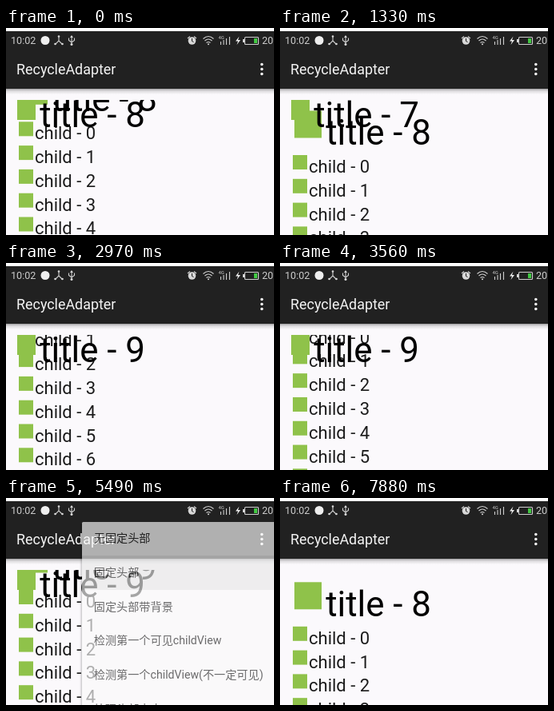
Write an HTML page that moves like this. It is 335 by 259 pixels and loops after 8 s.

```html
<!DOCTYPE html>
<html lang="en">
<head>
<meta charset="utf-8">
<title>RecycleAdapter</title>
<style>
  html, body { margin: 0; width: 100%; height: 100%; overflow: hidden; background: #fff; }
  svg { display: block; }
  text { font-family: Roboto, sans-serif; white-space: pre; }
  .title { font-size: 43.8px; }
  .child { font-size: 22px; fill: #1c1c1c; }
  .icon { fill: #8fc24a; }
  .status text { font-size: 12.6px; fill: #ccc; }
  .line { fill: none; stroke: #cfcfcf; stroke-width: 1.1; }
  .solid { fill: #d8d8d8; }
  #menu text { font: 14.15px Roboto, "Noto Sans CJK SC", "Noto Sans CJK", sans-serif; fill: #222; }
</style>
</head>
<body>
<svg id="stage" width="335" height="259" viewBox="0 0 335 259">
  <defs>
    <linearGradient id="drop" x2="0" y2="1">
      <stop stop-opacity=".36"/><stop offset=".4" stop-opacity=".12"/><stop offset="1" stop-opacity="0"/>
    </linearGradient>
    <linearGradient id="side">
      <stop stop-opacity="0"/><stop offset="1" stop-opacity=".3"/>
    </linearGradient>
  </defs>

  <rect y="76" width="335" height="183" fill="#fbf9fc"/>
  <svg x="14" y="90" width="321" height="169" viewBox="14 90 321 169">
    <g id="list"></g>
    <g id="pinned"></g>
  </svg>

  <rect y="4" width="335" height="72" fill="#212121"/>
  <rect y="76" width="335" height="7" fill="url(#drop)"/>

  <g class="status">
    <text x="6" y="20">10:02</text>
    <circle cx="49" cy="15.5" r="5.5" fill="#eee"/>
    <path class="line" d="M66 10v6l-4.5 4.5M66 16l4.5 4.5"/>
    <g class="solid">
      <circle cx="66" cy="10.5" r="1.3"/><circle cx="61.5" cy="20" r="1.3"/><circle cx="70.5" cy="20" r="1.3"/>
    </g>
    <path class="line" d="M82 11v10M78.5 12.5v3l3.5 2.5M85.5 12.5v3l-3.5 2.5"/>
    <path class="solid" d="M82 9l2 3h-4z"/><circle class="solid" cx="82" cy="20.5" r="1.5"/>
    <circle class="solid" cx="232.5" cy="16" r="4.8"/>
    <path class="line" d="M227 13l3-2.5M238 13l-3-2.5"/>
    <path d="M232.5 13v3.5l2 1" fill="none" stroke="#212121"/>
    <path class="line" d="M246.5 13.5q6.5-6 13 0M248.5 16q4.5-4 9 0M250.5 18.5q2.5-2 5 0"/>
    <circle class="solid" cx="253" cy="20.3" r="1"/>
    <text x="265.5" y="14" style="font-size:6px">4G</text>
    <path class="line" d="M268.5 21v-4M272 21v-6M275.5 21v-8M279.5 21v-10"/>
    <path d="M291.5 10.5l-4.5 6h3l-1.5 4.5 4.5-6h-3z" fill="#eee"/>
    <rect class="line" x="298.5" y="11.5" width="17" height="9" rx="1"/>
    <rect x="310" y="13" width="4" height="6" fill="#42c943"/>
    <rect class="solid" x="296" y="14" width="2" height="4"/>
    <text x="320" y="20">20%</text>
  </g>
  <text x="13" y="58" font-size="17.9" fill="#f4f4f4">RecycleAdapter</text>
  <g fill="#f4f4f4">
    <circle cx="319.8" cy="45.5" r="1.8"/><circle cx="319.8" cy="51.5" r="1.8"/><circle cx="319.8" cy="57.5" r="1.8"/>
  </g>

  <g id="menu">
    <rect x="92" y="32" width="3" height="227" fill="url(#side)"/>
    <rect x="95" y="30" width="245" height="234" rx="1.5" fill="#fafafa"/>
    <rect id="pressed" x="95" y="72" width="240" height="43" fill="#000" opacity=".07"/>
  </g>
</svg>
<script>
  const LOOP = 8000, STEP = 148.6, LEAD = 10;
  const ROW = 29.8, FIRST_CHILD = 42.5, SECTION = 298;
  const byId = id => document.getElementById(id);
  const list = byId('list'), pinned = byId('pinned'), menu = byId('menu'), pressed = byId('pressed');

  function add(parent, tag, attrs, text = '') {
    const node = document.createElementNS('http://www.w3.org/2000/svg', tag);
    for (const key in attrs) node.setAttribute(key, attrs[key]);
    node.textContent = text;
    return parent.appendChild(node);
  }

  // y is the vertical middle of the digits in the row.
  function addTitle(parent, y, number) {
    add(parent, 'rect', { class: 'icon', x: 18, y: y - 27, width: 34, height: 34 });
    return add(parent, 'text', { class: 'title', x: 57.2, y: y + 15.5 }, 'title - ' + number);
  }

  function addChildren(y, count) {
    for (let i = 0; i < count; i++) {
      const rowY = y + FIRST_CHILD + i * ROW;
      add(list, 'rect', { class: 'icon', x: 16, y: rowY - 14, width: 18, height: 18 });
      add(list, 'text', { class: 'child', x: 36, y: rowY + 8 }, 'child - ' + i);
    }
  }

  addTitle(list, -60, 7);
  addTitle(list, 0, 8);
  addChildren(0, 8);
  addTitle(list, SECTION, 9);
  addChildren(SECTION, 10);
  const pinnedText = addTitle(pinned, 108, 8);
  pinned.setAttribute('transform', 'translate(-15 0)');

  ['无固定头部', '固定头部', '固定头部带背景', '检测第一个可见childView',
   '检测第一个childView(不一定可见)', '处理头部点击'].forEach((label, i) =>
    add(menu, 'text', { x: 109.8, y: 55.2 + i * 42.7 }, label));

  // [step, position of "title - 8"]
  const scroll = [
    [0, 88.8], [9, 130.5], [20, 24 - SECTION], [29, 86.5 - SECTION],
    [38, 86.5 - SECTION], [44, 145.8], [54, 131.9]
  ];

  function scrollAt(step) {
    const i = scroll.findIndex(([end]) => end > step);
    const [s0, y0] = scroll[i - 1], [s1, y1] = scroll[i];
    const p = (step - s0) / (s1 - s0);
    return y0 + (y1 - y0) * p * p * (3 - 2 * p);
  }

  function menuAlpha(step) {
    if (step < 30 || step > 37) return 0;
    return step === 30 ? 0.6 : step === 37 ? 0.66 : 1;
  }

  function draw(now) {
    const step = Math.floor((now % LOOP + LEAD) / STEP);
    const y = scrollAt(step);
    list.setAttribute('transform', `translate(0 ${y})`);
    pinnedText.textContent = 'title - ' + (y > 124 ? 7 : y + SECTION > 124 ? 8 : 9);
    pinned.style.display = step < 38 ? '' : 'none';
    menu.style.opacity = menuAlpha(step);
    pressed.style.display = step === 37 ? '' : 'none';
  }

  const start = performance.now();
  function tick() {
    draw(performance.now() - start);
    requestAnimationFrame(tick);
  }
  tick();
</script>
</body>
</html>
```
